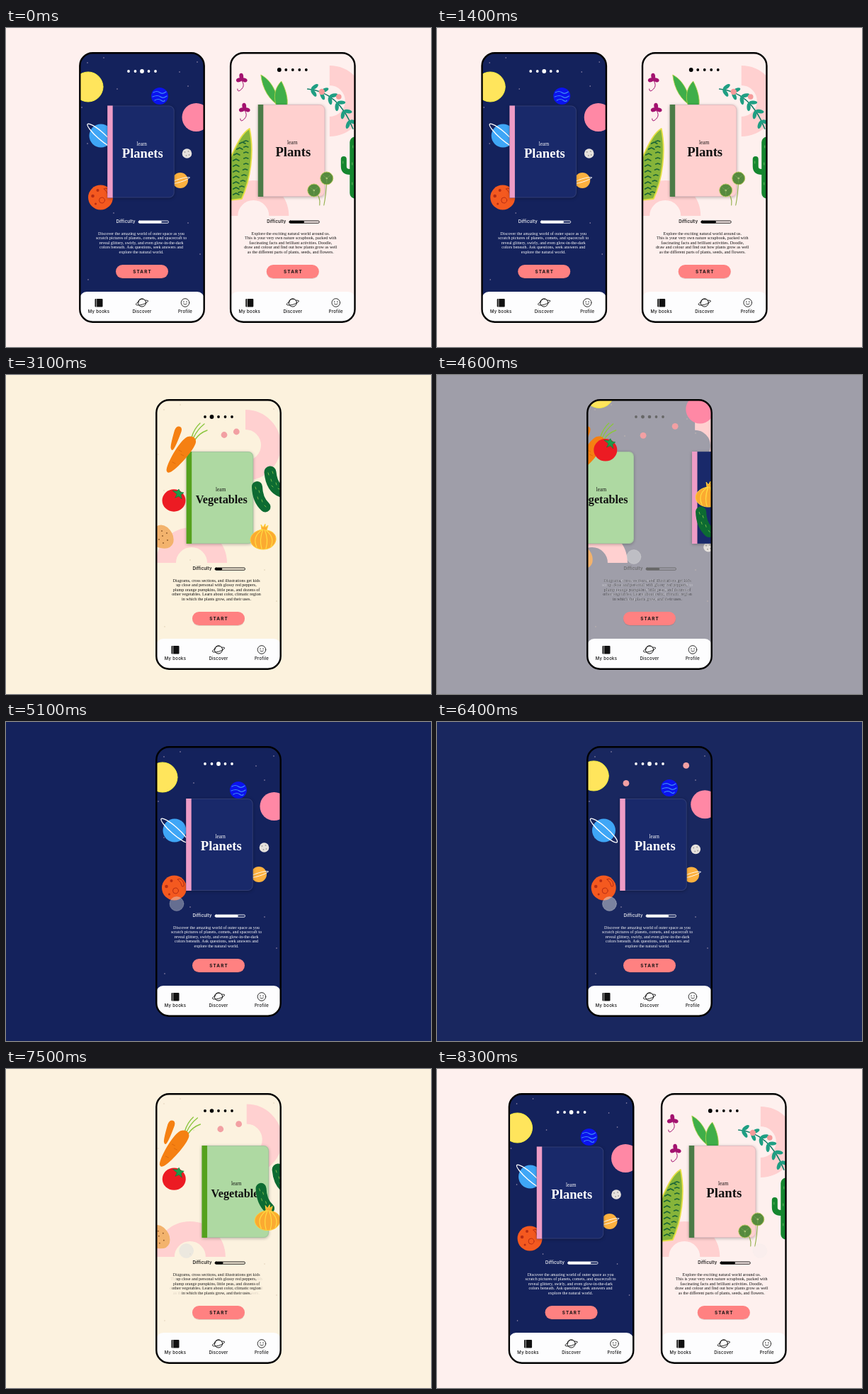
An HTML page with a canvas that plays this animation: 600x450 px, repeating every 8.4 s.

```html
<!DOCTYPE html>
<html lang="en">
<head>
<meta charset="utf-8">
<title>Book app</title>
<style>
html, body { margin: 0; width: 100%; height: 100%; overflow: hidden; }
canvas { display: block; width: 600px; height: 450px; }
</style>
</head>
<body>
<canvas></canvas>
<script>
const LOOP = 8400, SWIPE = 800, PAGE_GAP = 177;
const SERIF = '"Liberation Serif", serif', SANS = 'Inter, sans-serif';
const canvas = document.querySelector('canvas'), c = canvas.getContext('2d');
const ratio = window.devicePixelRatio || 1;
canvas.width = 600 * ratio;
canvas.height = 450 * ratio;

// Swipes of the page in the phone: [start, direction]
const swipes = [[1950, 1], [4229, 1], [6258, -1], [7250, -1]];

const pages = [
  { title: 'Plants', size: 18.7, ink: '#111', cover: '#ffd0cf', spine: '#4c7b47', x: -2, level: .5, text: [
    'Explore the exciting natural world around us.',
    'This is your very own nature scrapbook, packed with',
    'fascinating facts and brilliant activities. Doodle,',
    'draw and colour and find out how plants grow as well',
    'as the different parts of plants, seeds, and flowers.'] },
  { title: 'Vegetables', size: 16.2, ink: '#111', cover: '#aed9a2', spine: '#55a11d', x: 1.7, level: .24, text: [
    'Diagrams, cross sections, and illustrations get kids',
    'up close and personal with glossy red peppers,',
    'plump orange pumpkins, little peas, and dozens of',
    'other vegetables. Learn about color, climatic region',
    'in which the plants grow, and their uses.'] },
  { title: 'Planets', size: 18.6, ink: '#fff', cover: '#19296a', spine: '#ee9cc6', x: 1.2, level: .77, text: [
    'Discover the amazing world of outer space as you',
    'scratch pictures of planets, comets, and spacecraft to',
    'reveal glittery, swirly, and even glow-in-the-dark',
    'colors beneath. Ask questions, seek answers and',
    'explore the natural world.'] },
];
const backdrops = [[254, 240, 238], [252, 242, 221], [20, 34, 92]];
const inks = [[0, 0, 0], [0, 0, 0], [255, 255, 255]];

const clamp = v => Math.min(1, Math.max(0, v));
const ease = v => (v = clamp(v)) < .5 ? 4 * v ** 3 : 1 - 4 * (1 - v) ** 3;
const lerp = (a, b, k) => a + (b - a) * k;
const along = (list, q) => {
  const i = Math.min(1, Math.floor(q));
  return [list[i], list[i + 1], q - i];
};
const mixNumber = (list, q) => lerp(...along(list, q));
const mixColor = (list, q) => {
  const [a, b, k] = along(list, q);
  return `rgb(${a.map((v, i) => Math.round(lerp(v, b[i], k)))})`;
};

function shape(d, fill, stroke, width = 1) {
  const path = new Path2D(d);
  if (fill) { c.fillStyle = fill; c.fill(path); }
  if (stroke) { c.strokeStyle = stroke; c.lineWidth = width; c.stroke(path); }
}
function oval(x, y, rx, ry, turn, fill, stroke, width = 1) {
  c.beginPath();
  c.ellipse(x, y, rx, ry, turn, 0, 7);
  if (fill) { c.fillStyle = fill; c.fill(); }
  if (stroke) { c.strokeStyle = stroke; c.lineWidth = width; c.stroke(); }
}
const disc = (x, y, r, fill, stroke, width) => oval(x, y, r, r, 0, fill, stroke, width);
function box(x, y, w, h, r, fill, stroke, width = 1) {
  c.beginPath();
  c.roundRect(x, y, w, h, r);
  if (fill) { c.fillStyle = fill; c.fill(); }
  if (stroke) { c.strokeStyle = stroke; c.lineWidth = width; c.stroke(); }
}
function label(str, x, y, font, color, spacing = 0, align = 'center') {
  c.font = font;
  c.fillStyle = color;
  c.textAlign = align;
  c.textBaseline = 'alphabetic';
  c.letterSpacing = spacing + 'px';
  c.fillText(str, x, y);
}
function at(x, y, draw) {
  c.save();
  c.translate(x, y);
  draw();
  c.restore();
}

// Decorations: [x, y, exit dx, exit dy, draw, home dx, home dy]
const planets = [
  [-79, 78, 13, -88, () => disc(0, 0, 21, '#ffe55c', '#f7ee3c'), 3, 5],
  [78.5, 119, -12, -118, () => disc(0, 0, 20, '#ff88a5'), -2, 7],
  [-62, 153, -110, 0, () => {
    disc(0, 0, 16.5, '#3fa6f6');
    oval(0, 0, 25, 5, .72, null, '#fff', 1.3);
  }, 4, -1],
  [-62.5, 234, -100, 0, () => {
    disc(0, 0, 17.5, '#f4591f');
    const red = '#b62d14';
    disc(-4, -10, 2, red);
    disc(-11, -2, 2.3, red);
    disc(-7, 9, 1.5, red);
    disc(2, 4, 4, null, red);
    shape('M5-12Q9-15 13-8Q15-1 11-2Q10-8 5-12Z', null, red);
  }, 4, 5],
  [64.5, 177, 31, 110, () => {
    disc(0, 0, 6.8, '#e6e2dd');
    for (const [x, y] of [[-3, -2], [2, -3], [3, 2], [-1, 3]]) disc(x, y, 1, '#aaa5a2');
  }, -1, 0],
  [57, 215, 90, 20, () => {
    disc(0, 0, 11, '#fdb13f');
    oval(0, 0, 14, 2.2, -.3, null, '#fff', .9);
  }, -3, 0],
  [28, 96, 0, -130, () => {
    disc(0, 0, 12, '#0b13ee');
    shape('M-9-5Q-4-8 0-5T9-6M-10 1Q-3-2 1 1T10 0M-7 6Q-2 3 2 6T7 6', null, '#3f8cf5', 1.2);
  }, -3, 0],
];

const carrot = '#f58012';
const vegetables = [
  [-60, 90, -78, 0, () => shape('M-7 14Q-9 12-2-12Q1-19 6-17Q10-15 6-6Q-2 15-5 16Q-7 16-7 14Z', carrot)],
  [-52, 110, -78, 0, () => {
    shape('M14-22Q18-35 26-42M17-22Q22-33 32-41M19-19Q25-28 36-32', null, '#8cc63f', 1.4);
    shape('M-21 26C-24 20-6-12 4-20C10-26 21-24 20-15C18-4-8 24-16 27Q-20 29-21 26Z', carrot);
    shape('M-4-4l4 2M3 4l-4-2M-13 13l4 2', null, '#d9650c', .8);
  }],
  [-63, 177, 2, -177, () => {
    oval(0, 0, 16.5, 15.7, 0, '#ec1b23');
    shape('M4-9L-2-14L4-13L7-16L9-12L14-11L10-8L11-2L7-6L2-4Z', '#1f9a4a', '#0d7a38', .6);
  }],
  [-78, 229, -42, 70, () => {
    shape('M-14-12Q-4-22 6-14Q17-4 14 8Q10 18-4 15Q-16 13-16 0Z', '#f3b36d');
    for (const [x, y] of [[-2, -9], [5, -6], [-1, -2], [6, 4], [0, 8], [-6, 3]]) disc(x, y, .9, '#8a5527');
  }],
  [77, 150, 90, 40, () => {
    shape('M-4-13Q-2 9 12 14', null, '#0d6b32', 17);
    shape('M-7-12l1 3M-1-14l1 3M-3-3l1 3M4 2l1 3M-2 6l2 2M7 10l2 1', null, '#86c24c', .9);
  }],
  [60, 172, 45, 88, () => {
    shape('M-5.5-14.5Q-5 4 6 14', null, '#0d6b32', 15);
    shape('M-8-14l1 3M-3-9l1 3M-5 0l1 3M1 4l1 3M5 12l2 2', null, '#86c24c', .9);
  }],
  [63, 230, 50, -149, () => {
    shape('M-2-12L-3-19L0-15L3-20L3-15L7-18L5-11C14-10 19-4 18 3C16 12 8 16 0 16C-9 16-17 11-18 3C-18-5-11-10-2-12Z', '#fbaa31', '#ffcf3a');
    shape('M-1-12Q-16-2-9 13M0-12Q-6 2-2 15M2-12Q8 2 4 15M4-11Q17-1 11 12', null, '#ffdc42', 1.2);
  }],
  [8, 84.5, -42, 2, () => disc(0, 0, 4.4, '#f2a0a3')],
  [25.3, 80, 27, -19, () => disc(0, 0, 4.4, '#f2a0a3')],
];

function clover() {
  shape('M0 2Q5 9 0 14Q-6 20-6 14', null, '#a3126f');
  for (const a of [-1.7, .35, 2.8]) oval(4 * Math.cos(a), 4 * Math.sin(a), 4.2, 2.9, a, '#a3126f');
}
function branch() {
  shape('M-34-26Q10-22 30 30', null, '#14806a', 1.7);
  for (let i = 0; i < 6; i++) {
    const k = .06 + i * .165, j = 1 - k;
    const x = -34 * j * j + 20 * k * j + 30 * k * k;
    const y = -26 * j * j - 44 * k * j + 30 * k * k;
    const a = Math.atan2(8 * j + 104 * k, 88 * j + 40 * k);
    for (const side of [-.8, .8]) {
      oval(x + 6 * Math.cos(a + side), y + 6 * Math.sin(a + side), 6, 2.7, a + side, '#1f9f83');
    }
  }
  disc(-14, -22, 4.2, '#f69a9a');
  disc(10, -15, 3.8, '#f69a9a');
}
const leafBehind = [-27, 108, -10, -110, () => {
  const green = '#3fae49', edge = '#bcd648';
  shape('M8 2C-6-6-16-22-18-42C-6-36 4-22 8 2Z', green, edge, .8);
  shape('M4 2C-2-14 4-26 11-33C17-22 21-8 19 2Z', green, edge, .8);
}];
const plants = [
  [-72, 72, -80, -30, clover],
  [-68, 114, -80, -10, clover],
  [55, 112, 90, -30, branch],
  [85, 200, 60, 10, () => {
    shape('M3-39V33', null, '#15862f', 15);
    shape('M-13-15V-5Q-13 3-4 3H2', null, '#15862f', 8);
    shape('M0-34v3M3-22v3M-1-10v3M3 4v3M-1 18v3M-14-12v3', null, '#7cc36c', .8);
  }],
  [-75, 195, -60, 10, () => {
    shape('M14-53C21-20 15 20 3 46L-14 48V-10C-5-28 2-46 14-53Z', '#86b43a', '#e6df45', 1.8);
    for (let y = -34; y < 42; y += 8) {
      const right = 13 - Math.max(0, y) * .2, left = Math.max(-12, -6 - y * .5 - 14);
      shape(`M${left + 3} ${y + 2}l4-2 4 2M${right - 7} ${y - 1}l3-1 3 1`, null, '#1d6636', 1.8);
    }
  }],
  [40, 222, 90, 60, () => {
    shape('M8-8Q7 14 4 28M-10 8Q0 16-2 28', null, '#93b04c', 1.1);
    for (const [x, y] of [[8, -10], [-10, 7]]) {
      disc(x, y, 9, '#568a3e', '#b5c75c');
      disc(x, y, 1.2, '#d9e6a0');
      shape(`M${x - 5} ${y - 4}L${x} ${y}L${x + 5} ${y - 4}M${x} ${y}v6`, null, '#78a653', .7);
    }
  }],
];

function decorate(items, away, home) {
  if (away >= 1) return;
  for (const [x, y, dx, dy, draw, hx = 0, hy = 0] of items) {
    at(x + dx * away + home * hx, y + dy * away + home * hy, draw);
  }
}

function book(page, x, y) {
  at(x, y, () => {
    c.shadowColor = 'rgba(0,0,0,.28)';
    c.shadowBlur = 4 * ratio;
    c.shadowOffsetY = ratio;
    box(-47, 108, 94.5, 130, [0, 7, 7, 0], page.cover);
    c.shadowColor = 'transparent';
    box(-46.5, 108.5, 93.5, 129, [0, 7, 7, 0], null, 'rgba(130,130,150,.3)', .8);
    box(-47, 108, 7.5, 130, 0, page.spine);
    label('learn', 1.5, 164, `7.2px ${SERIF}`, page.ink);
    label(page.title, 2.5, 181, `bold ${page.size}px ${SERIF}`, page.ink);
  });
}

function rings(q) {
  const pink = '#ffd0d0';
  c.lineCap = 'butt';
  at(mixNumber([52, 38, 103], q), mixNumber([103, 99, 101], q), () => shape('M0-36A36 36 0 0 1 0 36', null, pink, 28));
  at(mixNumber([-55.5, -38, -145], q), 265, () => shape('M-36 0A36 36 0 0 1 36 0', null, pink, 28));
  c.lineCap = 'round';
}

function stars(q) {
  const spots = [[-77, 49], [-54, 42], [78, 48], [53, 62], [-35, 86], [65, 82], [-85, 112],
    [-77, 163], [65, 275], [-40, 261], [82, 319], [-76, 355]];
  c.globalAlpha = Math.min(1, q) * .6;
  const color = mixColor([[200, 180, 150], [200, 180, 150], [255, 225, 235]], q);
  for (const [x, y] of spots) disc(x, y, .8, color);
  c.globalAlpha = 1;
}

function navigation() {
  const black = '#111', font = `500 6px ${SANS}`;
  box(-88, 372, 176, 44, [10, 10, 0, 0], '#fdfdfe');
  box(-66.5, 382, 11, 11.5, 1, black);
  shape('M-64.3 382V393.5', null, '#fff', .7);
  disc(0, 387.5, 5.6, '#fff', black);
  oval(0, 387.5, 9, 2.6, -.28, null, black, .9);
  shape('M-5.2 386.5A5.6 5.6 0 0 1 4.6 384.5L3 387Z', '#fff');
  shape('M-5.4 387A5.6 5.6 0 0 1 5 385', null, black);
  disc(61, 387.5, 5.8, '#fff', black, .9);
  disc(59, 386.3, .7, black);
  disc(63, 386.3, .7, black);
  shape('M58.6 389Q61 391.6 63.4 389', null, black, .8);
  label('My books', -61, 402, font, black, .3);
  label('Discover', 0, 402, font, black, .2);
  label('Profile', 61, 402, font, black, .2);
}

function controls(q, home) {
  const ink = mixColor(inks, q);
  for (let i = 0; i < 5; i++) {
    disc((i - 2) * 9.5, 59 + home * 2, 1.9 + clamp(1 - Math.abs(i - q)), ink);
  }
  label('Difficulty', -36.5, 275.2, `500 6px ${SANS}`, ink, .1, 'left');
  box(-5, 272, 42.5, 3.2, 1.6, null, ink, .9);
  box(-5, 272, 42.5 * mixNumber(pages.map(p => p.level), q), 3.2, 1.6, ink);
  pages.forEach((page, i) => {
    c.globalAlpha = clamp(1 - Math.abs(i - q));
    if (c.globalAlpha > 0) page.text.forEach((line, n) =>
      label(line, home ? -1 : -3, 291.5 + n * 6.6, `6.1px ${SERIF}`, page.ink));
  });
  c.globalAlpha = 1;
  box(-37, 335, 74, 19, 9.5, 'rgba(120,60,60,.2)');
  box(-37, 334, 74, 19, 9.5, '#ff8181');
  label('START', .6, 345.7, `bold 6.3px ${SANS}`, '#111', 1.2);
}

function touches(t) {
  for (const [start, dir] of swipes) {
    const end = start + SWIPE, k = clamp((t - start) / SWIPE);
    const alpha = Math.min(clamp((t - start + 150) / 150), clamp((end + 350 - t) / 350));
    if (alpha <= 0) continue;
    const x = dir > 0 ? lerp(52, -59, Math.sin(k * Math.PI / 2)) : lerp(-59, 51, ease(k));
    c.globalAlpha = alpha;
    disc(x, 256.5, 10, 'rgba(222,224,224,.5)', 'rgba(222,224,224,.4)', .8);
    c.globalAlpha = 1;
  }
}

function phone(x, q, home, t) {
  at(x, 0, () => {
    c.lineCap = c.lineJoin = 'round';
    c.save();
    box(-87.5, 35.5, 175, 379, 18, mixColor(backdrops, q));
    c.clip();
    stars(q);
    rings(q);
    decorate(planets, 2 - q, home);
    decorate([leafBehind], q, 0);
    pages.forEach((page, i) => {
      if (Math.abs(i - q) < 1) book(page, page.x + PAGE_GAP * (i - q) - home * 3, home * 1.5);
    });
    decorate(plants, q, 0);
    decorate(vegetables, Math.abs(q - 1), 0);
    controls(q, home);
    if (!home) touches(t);
    navigation();
    c.restore();
    box(-87.7, 35.3, 175.4, 379.4, 18, null, '#000', 2.4);
  });
}

function frame(now) {
  const t = now % LOOP;
  const q = clamp(swipes.reduce((sum, [start, dir]) => sum + dir * ease((t - start) / SWIPE), 0) / 2) * 2;
  const mainAway = ease((t - 1080) / 800) - ease((t - 7530) / 800);
  const sideAway = ease((t - 1080) / 980) - ease((t - 7673) / 720);
  c.setTransform(ratio, 0, 0, ratio, 0, 0);
  c.fillStyle = mixColor(backdrops, q);
  c.fillRect(0, 0, 600, 450);
  if (sideAway < 1) phone(192 - 290 * sideAway, 2, 1, t);
  phone(lerp(404.8, 300, mainAway), q, 0, t);
  requestAnimationFrame(frame);
}
requestAnimationFrame(frame);
</script>
</body>
</html>
```
